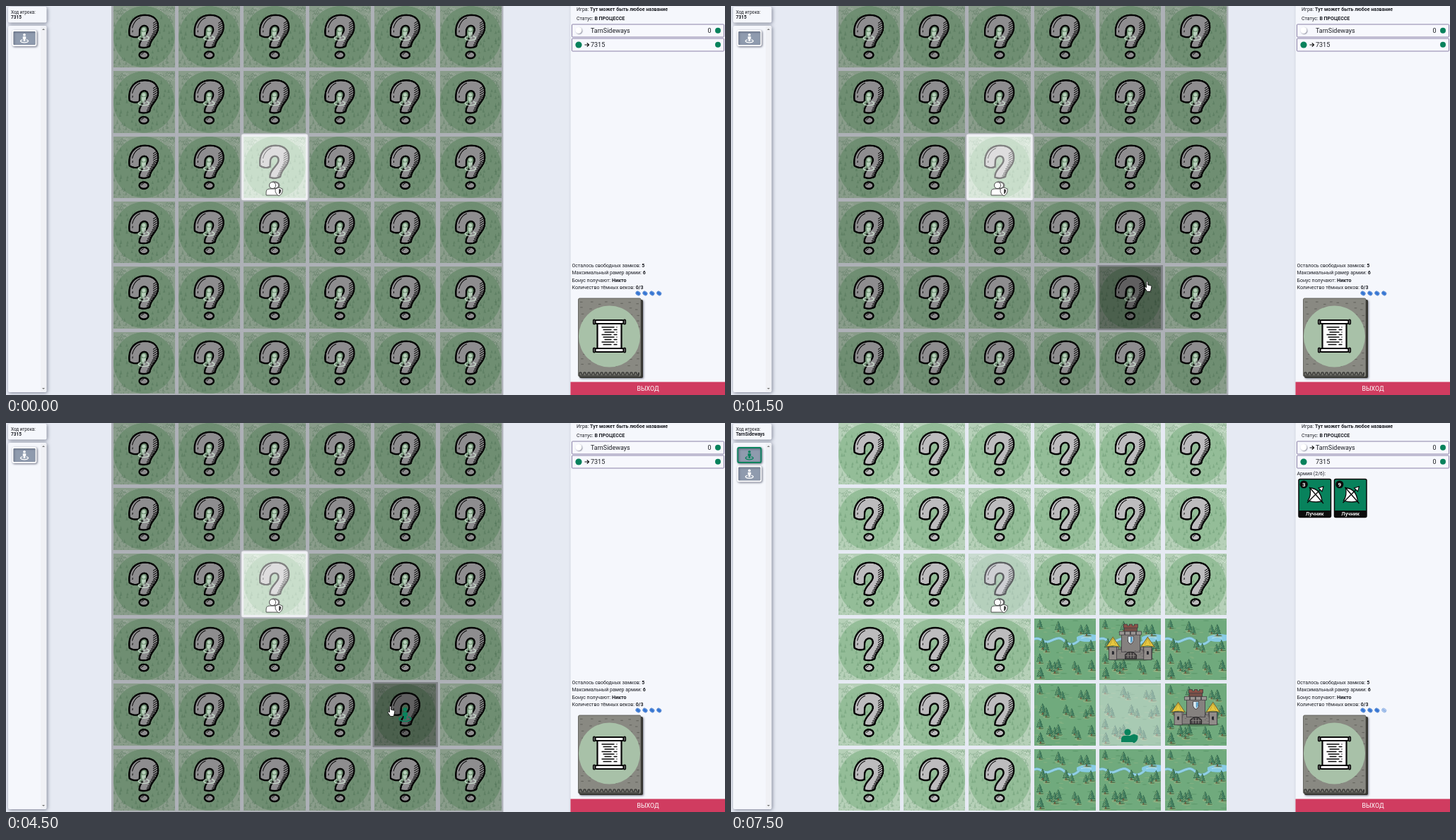
Write an HTML page with a canvas that moves like this. It is 1017 px wide and 551 px high and loops after 8000 ms.

```html
<!DOCTYPE html>
<html lang="ru">
<head>
<meta charset="utf-8">
<title>Поле</title>
<style>
html, body { margin: 0; width: 100%; height: 100%; overflow: hidden; background: #e6eaf3 }
canvas { display: block }
</style>
</head>
<body>
<canvas id="stage" width="1017" height="551"></canvas>
<script>
const stage = document.getElementById('stage').getContext('2d');
let g = stage;
const GREEN = '#08825c', TAU = Math.PI * 2;
const SIZE = 87.3, PITCH = 92.4, LEFT = 151.5, TOP = -.2;
const HOST = 'TarnSideways', GUEST = '7315';

let seed = 1;
const rnd = () => (seed = seed * 16807 % 2147483647) / 2147483647;

// ---- drawing helpers ----
function paint(path, fill, stroke, width = 1) {
  if (fill) { g.fillStyle = fill; g.fill(path); }
  if (stroke) { g.strokeStyle = stroke; g.lineWidth = width; g.stroke(path); }
}
function shape(d, fill, stroke, width) { paint(new Path2D(d), fill, stroke, width); }
function rect(x, y, w, h, fill, r = 0, stroke, width) {
  const p = new Path2D();
  p.roundRect(x, y, w, h, r);
  paint(p, fill, stroke, width);
}
function oval(x, y, rx, ry, fill, stroke, width, turn = 0) {
  const p = new Path2D();
  p.ellipse(x, y, rx, ry, turn, 0, TAU);
  paint(p, fill, stroke, width);
}
function dot(x, y, r, fill, stroke, width) { oval(x, y, r, r, fill, stroke, width); }
function at(x, y, draw, scale = 1) {
  g.save();
  g.translate(x, y);
  g.scale(scale, scale);
  draw();
  g.restore();
}
function shadowed(draw, blur = 4, dx = 1, dy = 1, color = 'rgba(30,35,60,.55)') {
  g.save();
  Object.assign(g, { shadowBlur: blur, shadowOffsetX: dx, shadowOffsetY: dy, shadowColor: color });
  draw();
  g.restore();
}
function text(str, x, y, size = 7, weight = 400, color = '#1c1e24', align = 'left') {
  g.font = `${weight} ${size}px Roboto, sans-serif`;
  g.fillStyle = color;
  g.textAlign = align;
  g.fillText(str, x, y);
  return g.measureText(str).width;
}
function pair(label, value, x, y) {
  text(value, x + text(label + ' ', x, y), y, 7, 700);
}
function sprite(w, h, draw) {
  const c = document.createElement('canvas');
  c.width = w * 2;
  c.height = h * 2;
  g = c.getContext('2d');
  g.scale(2, 2);
  draw();
  g = stage;
  return c;
}

// ---- tiles ----
function hiddenTile() {
  seed = 41;
  rect(0, 0, SIZE, SIZE, '#b6d0b8');
  for (let i = 0; i < 48; i++) {
    const x = rnd() * 86, y = 2 + rnd() * 12;
    shape(`M${x} ${y + 2}l2.5 -3 2 2.5 1.5 -1.5 2 3`, null, i % 2 ? 'rgba(225,238,225,.55)' : 'rgba(80,125,88,.3)', .7);
  }
  for (let i = 0; i < 65; i++)
    rect(rnd() * 85, 75 + rnd() * 11, 1.6, .8, 'rgba(80,130,90,.25)');
  dot(43.6, 43.6, 43.3, 'rgba(146,188,150,.92)');
  for (let y = 18; y < 88; y += 9)
    for (let x = 0; x < 88; x += 7.5) {
      const h = 4 + rnd() * 3, px = x + rnd() * 6, py = y + rnd() * 6;
      shape(`M${px} ${py - h}l1.7 ${h}h-3.4z`, 'rgba(66,122,80,.24)');
    }
  g.lineJoin = g.lineCap = 'round';
  shape('M23 41.5C21 25 29 13 45 13C58 13 64 20.5 63.5 31C63 42 53 46 51.5 57Q45 60.5 37 58C36 47 49 41 49 33.5C49 26 39 26 37.5 34L37 43Q30 46 23 41.5Z', '#bdbcbe', '#050505', 2.4);
  shape('M27 31Q30 20 38 17M27.5 35l-.2 2', null, '#111', 1);
  // Hatching follows the right-hand edge of the stem
  for (let i = 0; i < 12; i++) {
    const y = 21 + i * 3.1, x = i < 5 ? 62 : 62.2 - (i - 4) * 1.55;
    shape(`M${x} ${y}l-5.5 3.4`, null, '#111', 1);
  }
  oval(43.3, 69.3, 6.4, 4.7, '#bdbcbe', '#050505', 2.4);
  shape('M40 69q1 -2 3 -2.3', null, '#222', .9);
}

const PINES = [[34, 18], [40, 22], [8, 14], [66, 21], [74, 24], [12, 43], [17, 47], [45, 43], [53, 47],
  [73, 48], [80, 45], [22, 73], [29, 77], [34, 72], [57, 72], [62, 78], [8, 63], [81, 73], [9, 84]];

function pine(x, y, s) {
  at(x, y, () => {
    oval(1, .6, 6, 1.8, 'rgba(172,180,132,.55)');
    oval(2, 0, 4.5, 1.1, 'rgba(45,95,62,.6)');
    rect(-.9, -4, 1.8, 4.5, '#72593c');
    shape('M0 -15L2.5 -10H1.5L4 -6H2.6L5 -2.5H-5L-2.6 -6H-4L-1.5 -10H-2.5Z', '#447f61', '#2f6449', .6);
    shape('M-.5 -13L-2 -9.5M-1 -8.5L-3 -5.5M0 -6L-3.5 -3.2', null, '#86ad78', .8);
  }, s);
}
function forest(river) {
  seed = 73;
  rect(0, 0, SIZE, SIZE, '#70aa7d');
  for (let i = 0; i < 40; i++)
    oval(rnd() * 87, rnd() * 87, 2 + rnd() * 3, .7, i % 2 ? 'rgba(60,122,76,.3)' : 'rgba(165,190,140,.35)');
  if (river) {
    const d = 'M0 29C9 25 12 36 22 32S36 25 43 32S57 37 64 30S77 24 88 28';
    shape(d, null, '#67a5a8', 4);
    shape(d, null, '#91d0e6', 3);
    shape('M60 26Q72 20 88 23V31Q73 35 60 30', '#87cbe4');
    shape('M66 28q8 -3 15 0', null, '#c0e9f5', .8);
  }
  for (const [x, y] of PINES) pine(x, y, .75 + rnd() * .3);
}
function castle(river) {
  forest(river);
  const wall = '#85817f', line = '#3f3b40';
  oval(44, 57, 33, 3, 'rgba(40,60,38,.4)');
  rect(14, 43, 60, 14, wall, 0, line, .8);
  for (let x = 16; x < 72; x += 7) rect(x, 40, 4, 4, wall, 0, line, .6);
  rect(31, 21, 26, 26, wall, 0, line, .8);
  for (const x of [28, 36, 44, 52]) rect(x, 18, 7, 5, '#9a9593', 0, line, .7);
  rect(35, 12, 18, 6, '#755049', 0, line, .8);
  shape('M34 13V8h5v2h3V8h4v2h3V8h5v5z', '#8c5248', line, .8);
  for (const x of [19, 68]) {
    rect(x - 5.5, 40, 11, 18, '#918c89', 0, line, .8);
    shape(`M${x} 26L${x + 9.5} 40Q${x} 37 ${x - 9.5} 40Z`, '#e7c83f', '#75612c', .8);
    shape(`M${x} 28l-4 9M${x} 28l4 9`, null, '#b59a36', .7);
    rect(x - 1.5, 46, 3, 5, '#292a30', 1);
  }
  shape('M40 25h8v5q0 4 -4 6q-4 -2 -4 -6z', '#d9e7ee', line, .8);
  shape('M44 26h3v4q0 3 -3 4.5z', '#5b9fc7');
  shape('M36 57V51Q44 43 52 51V57Z', '#4a4648', '#222', .8);
  shape('M37 52h14M40 49v7M44 48v8M48 49v7', null, '#95908b', .8);
  for (let i = 0; i < 18; i++) rect(15 + rnd() * 55, 44 + rnd() * 11, 2.5, .7, 'rgba(50,45,45,.35)');
}

const hidden = sprite(SIZE, SIZE, hiddenTile);
const plain = sprite(SIZE, SIZE, () => forest(false));
const riverside = sprite(SIZE, SIZE, () => forest(true));
const fortRiver = sprite(SIZE, SIZE, () => castle(true));
const fort = sprite(SIZE, SIZE, () => castle(false));

const cellX = c => LEFT + c * PITCH, cellY = r => TOP + r * PITCH;

function openTile(c, r) {
  if (c === 4 && r === 3) return fortRiver;
  if (c === 5 && r === 4) return fort;
  return r === 4 ? plain : riverside;
}
// Perspective turn about the vertical axis, one pixel column at a time
function turned(img, x, y) {
  const squeeze = .434;
  for (let dx = -17; dx < 21; dx++) {
    const s = .9 + .21 * (dx + 17) / 38, w = 2 / (s * squeeze);
    const sx = Math.min(Math.max((dx / (s * squeeze) + SIZE / 2) * 2, 0), 174 - w);
    const h = SIZE * s;
    g.drawImage(img, sx, 0, w, 174, Math.round(x + SIZE / 2) + dx, y + (SIZE - h) / 2, 1, h);
  }
}

// ---- icons ----
function pin(x, y, color, s = 1) {
  at(x, y, () => {
    dot(0, -7.2, 2.8, color);
    shape('M-3.4 -3.5H3.4V2H2V7H-2V2H-3.4Z', color);
    shape('M-4 3.5C-12 5 -8 9.5 0 9.5S12 5 4 3.5', null, color, 1.9);
  }, s);
}
function guard(x, y, color, line) {
  at(x, y, () => {
    if (line) dot(2.5, -5, 4, color, line, .8);
    dot(-2, -5, 4.6, color, line, .9);
    shape('M-11 9V5Q-11 0 -6 0H2Q6 0 7 5V9Z', color, line, .9);
    shape('M7 -2L12 0V4Q11 8 7 10Q3 8 2 4V0Z', color, line || color, .9);
    if (line) shape('M7 0L10 1.3V4Q9.5 6 7 7.5Z', '#444');
  });
}
function pointer(x, y, hand) {
  at(x, y, () => shape(hand
    ? 'M2.5 1.3C2.5 -.4 4.6 -.4 4.6 1.3V5L8.5 6C9.6 6.3 10 7 9.8 8L9 12L8 14.5H3.7L.3 9.5C-.4 8 1 7.2 2 8.2L2.5 9Z'
    : 'M0 0V10L2.4 7.8 4 11.4 5.6 10.7 4 7.2H7.2Z', '#fff', '#111', .9));
}
function bow(x, y) {
  at(x, y, () => {
    shape('M-7 -10Q8 -9 10 9Q-1 11 -10 8Q-5 1 -7 -10Z', '#fff', '#080808', 1.3);
    shape('M-8 -11L12 12M-11 11L9 -9', null, '#080808', 1.4);
    shape('M12 -12L10 -5 5 -10Z', '#fff', '#080808', 1.1);
  });
}

// ---- panels ----
function pinButton(y, active) {
  shadowed(() => rect(9.5, y, 33, 21, '#8f9bae', 2, active ? GREEN : '#fff', 1.8), 3, 1, 1);
  pin(26, y + 10.5, active ? GREEN : '#fff', .66);
}
function leftPanel(started) {
  for (const [y, h] of [[1, 22.5], [28, 519]])
    shadowed(() => rect(3, y, 54.5, h, '#f5f7fc', 2), 5, 1, 1);
  text('Ход игрока:', 7, 11.3, 6.4);
  text(started ? HOST : GUEST, 7, 18.3, 6.5, 700);
  rect(49, 29, 8, 517, '#f0f1f5');
  shape('M51 34l2 -2 2 2zM51 541l2 2 2 -2z', '#777');
  pinButton(35, started);
  if (started) pinButton(61.5);
}
function playerRow(y, name, active, score, color) {
  rect(800.5, y, 215, 18, '#f7f8fd', 1, '#7e739e', .9);
  if (color === '#fff') shadowed(() => dot(810, y + 8.5, 4.5, color), 1.5, .8, .8);
  else dot(810, y + 9, 4.6, color);
  if (active) shape(`M818.5 ${y + 9}h6m-2.7 -2.7l2.7 2.7 -2.7 2.7`, null, '#111', 1.2);
  text(name, 827, y + 12.2, 9);
  if (score) text('0', 992.5, y + 12.2, 9);
  dot(1007, y + 8.8, 4, GREEN);
}
function armyCard(x, n, loaded) {
  rect(x, 79.5, 45.5, 54, GREEN, 2, '#080808', 1.5);
  if (loaded) bow(x + 23, 102);
  rect(x, 124, 45.5, 9.5, '#0c0c0c', 1);
  text('Лучник', x + 22.8, 131.3, 7.5, 500, '#fff', 'center');
  dot(x + 7.3, 87, 5.6, '#0c0c0c');
  text(n, x + 7.3, 90, 8, 700, '#fff', 'center');
}
function deck() {
  shadowed(() => rect(811, 416, 90, 111, '#34342f', 2), 3);
  rect(809.5, 414, 88.5, 111, '#898982', 2, '#55554f', .8);
  seed = 9;
  for (let y = 418; y < 514; y += 8)
    for (let x = 812; x < 892; x += 11)
      rect(x + rnd() * 5, y + rnd() * 4, 3.5, 1.2, 'rgba(54,54,49,.4)');
  shape('M811 519' + 'h3v3h3v-3'.repeat(14) + 'V524H811Z', '#777770', '#252522', 1);
  dot(853.5, 468, 43.5, '#a8c1a8');
  at(853.5, 467.5, () => {
    shape('M-17 -19H17V19H-17Z', '#fff', '#080808', 2.2);
    for (const y of [-20, 20]) {
      rect(-20, y - 2.5, 40, 5, '#fff', 2, '#080808', 2);
      for (const x of [-21.5, 21.5]) rect(x - 1.2, y - 3.2, 2.4, 6.4, '#fff', 1.2, '#080808', 1.8);
    }
    for (let i = 0; i < 8; i++) {
      const y = -12.5 + i * 3.5, a = -11 + i % 3 * 2;
      shape(`M${a} ${y}H${i % 2 ? 3 : 7}M${i % 2 ? 6 : 10} ${y}H11`, null, '#080808', 1.6);
    }
  });
}
function rightPanel(started, loaded) {
  shadowed(() => rect(798.5, -5, 230, 561, '#f5f7fc'), 3, -1, 0, 'rgba(40,50,80,.2)');
  pair('Игра:', 'Тут может быть любое название', 807, 6.6);
  pair('Статус:', 'В ПРОЦЕССЕ', 807, 19.8);
  playerRow(26, HOST, started, true, '#fff');
  playerRow(46, GUEST, !started, started, GREEN);
  if (started) {
    text('Армия (2/6):', 800.5, 74.3);
    armyCard(803, '3', loaded);
    armyCard(853.5, '9', loaded);
  }
  pair('Осталось свободных замков:', '5', 800.5, 370);
  pair('Максимальный рамер армии:', '6', 800.5, 380.4);
  pair('Бонус получают:', 'Никто', 800.5, 390.8);
  pair('Количество тёмных веков:', '0/3', 800.5, 401.2);
  for (let i = 0; i < 4; i++) {
    g.globalAlpha = started && i === 3 ? .4 : 1;
    oval(894 + i * 9.9, 407, 3.5, 2.8, '#3f7fdc', '#7b9fd4', .8, .6);
    shape(`M${892 + i * 9.9} 405.5l4 3`, null, '#2862b5', .8);
  }
  g.globalAlpha = 1;
  deck();
  rect(798.5, 532.5, 219, 19, '#d03c60');
  text('ВЫХОД', 908, 545.2, 8.8, 400, '#fff', 'center');
}
function toast(alpha) {
  g.globalAlpha = alpha;
  shadowed(() => rect(11.5, 10.5, 189, 36, GREEN, 2), 4);
  dot(30, 28.3, 8.8, '#fff');
  shape('M25.8 28.5l3 3 5.5 -6', null, GREEN, 1.8);
  text(`ИГРОК ${GUEST}`, 48.5, 23.8, 7.6, 700, '#fff');
  text('Выбрал стартовую позицию', 48.5, 38.3, 7.7, 500, '#fff');
  shape('M177 23l10 10m0 -10l-10 10', null, '#fff', 1.8);
  g.globalAlpha = 1;
}
function tooltip(x, y) {
  shadowed(() => rect(x + .5, y + .5, 46.5, 12.5, '#fff', 0, '#555', .8), 2);
  text('Выбор места', x + 4, y + 9, 6.6);
}

// ---- board ----
function cover(c, r, style) {
  rect(cellX(c) - 2.5, cellY(r) - 2.5, PITCH, PITCH, style);
}
function choosing(hover, lit) {
  for (let r = 0; r < 6; r++) for (let c = 0; c < 6; c++) {
    const x = cellX(c), y = cellY(r);
    const isHover = hover && c === hover[0] && r === hover[1];
    const isLit = lit && c === lit[0] && r === lit[1];
    if (c === 2 && r === 2) continue;
    cover(c, r, 'rgba(0,0,0,.25)');
    if (isHover) {
      cover(c, r, 'rgba(0,0,0,.25)');
      rect(x, y, SIZE, SIZE, 'rgba(0,0,0,.1)');
    }
    pin(x + 43.4, y + (isLit ? 43.5 : 40), isLit ? GREEN : `rgba(215,238,220,${isHover ? .45 : .7})`, isLit ? 1 : .9);
  }
  shadowed(() => rect(cellX(2) - 1.8, cellY(2) - 1.8, 91, 91, 'rgba(255,255,255,.4)', 1, '#eeeef3', 2.4), 3, 0, 0, 'rgba(255,255,255,.4)');
}
function board(started, turning) {
  for (let r = 0; r < 6; r++) for (let c = 0; c < 6; c++) {
    const x = cellX(c), y = cellY(r), open = started && c > 2 && r > 2;
    if (open && turning) turned(openTile(c, r), x, y);
    else g.drawImage(open ? openTile(c, r) : hidden, x, y, SIZE, SIZE);
  }
}

// tick, hovered cell, lit cell, pointer, tooltip
const moves = [
  [0],
  [1, [5, 0], null, [668, 35]],
  [2, [4, 1], null, [590, 125]],
  [3, [3, 2], [3, 2], [473, 226]],
  [4, [4, 3], [3, 2], [570, 292]],
  [5, [5, 3], null, [642, 334]],
  [6, [4, 4], null, [585, 390]],
  [7, [3, 4], null, [480, 405]],
  [8, [2, 4], [2, 4], [384, 410]],
  [9, [2, 4], [2, 4], [384, 410], [387, 431]],
  [10, [2, 4], [2, 4], [431, 354], [387, 431]],
  [11, [3, 3], null, [476, 332]],
  [12, [4, 3], null, [550, 325]],
  [13, [4, 3], [4, 3], [567, 322]],
  [14, [4, 4], [4, 4], [540, 401]],
  [15, [4, 4], [4, 4], [540, 401], [545, 390]],
  [18, [4, 4], [4, 4], [540, 401]],
  [20, null, null, [539, 401]],
  [24, null, null, [538, 352]],
  [25, null, null, [536, 310]],
  [26, null, null, [390, 182]],
  [27, null, null, [181, 27]],
  [29]
];

function draw(tick) {
  const started = tick >= 20;
  const [, hover, lit, mouse, tip] = moves.findLast(m => m[0] <= tick);
  rect(0, 0, 1017, 551, '#e6eaf3');
  board(started, tick === 20);
  if (started) {
    rect(cellX(2), cellY(2), SIZE, SIZE, 'rgba(230,234,243,.4)');
    rect(cellX(4), cellY(4), SIZE, tick === 20 ? 91 : SIZE, 'rgba(240,243,250,.43)');
    guard(563, 443, GREEN);
  } else choosing(hover, lit);
  guard(379, 259, '#fff', '#444');
  leftPanel(started);
  rightPanel(started, tick > 20);
  if (started && tick < 30) toast(tick < 28 ? 1 : tick === 28 ? .55 : .2);
  if (tip) tooltip(...tip);
  if (mouse) pointer(...mouse, !started);
}

let shown = -1;
function loop() {
  const tick = Math.floor(performance.now() % 8000 / 250);
  if (tick !== shown) draw(shown = tick);
  requestAnimationFrame(loop);
}
loop();
</script>
</body>
</html>
```
